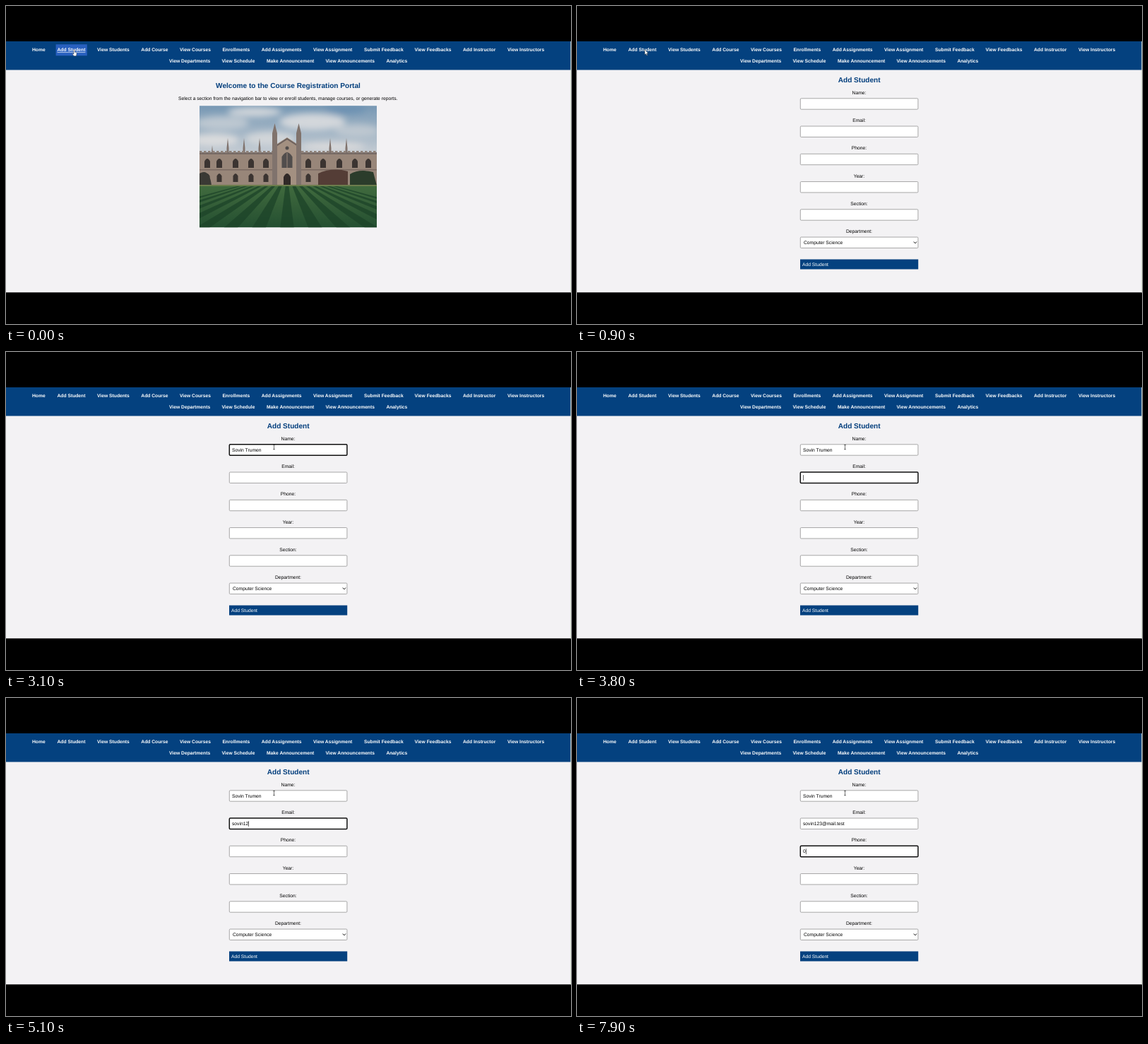
Write an HTML page that moves like this. It is 800 by 450 pixels and loops after 8 s.

```html
<!DOCTYPE html>
<html lang="en">
<head>
<meta charset="utf-8">
<title>Course Registration Portal</title>
<style>
html, body { margin: 0; width: 100%; height: 100%; overflow: hidden; background: #000; }
svg { display: block; width: 800px; height: 450px; }
text { font: 6.72px "Liberation Sans", Arial, sans-serif; text-rendering: geometricPrecision; white-space: pre; }
.mid { text-anchor: middle; }
.nav { font-weight: bold; fill: #fff; }
.title { font-size: 10.08px; font-weight: bold; fill: #043f7d; }
.hint { font: 600 6.4px "Open Sans", "Noto Sans", sans-serif; fill: #e6e6e6; }
</style>
</head>
<body>
<svg id="stage" viewBox="0 0 800 450"></svg>
<script>
const LOOP = 8000, BLUE = '#04417f';
const stage = document.getElementById('stage');
const pen = document.createElement('canvas').getContext('2d');
pen.font = '100px "Liberation Sans", Arial, sans-serif';
const textWidth = s => pen.measureText(s).width * 0.0672;

const text = (x, y, s, attrs = '') => `<text x="${x}" y="${y}" ${attrs}>${s}</text>`;
const rect = (x, y, w, h, fill, attrs = '') =>
  `<rect x="${x}" y="${y}" width="${w}" height="${h}" fill="${fill}" ${attrs}/>`;
const path = (d, fill, attrs = '') => `<path d="${d}" fill="${fill}" ${attrs}/>`;
const each = (list, fn) => list.map(fn).join('');

// Navigation and page background
const navRows = [
  [64.4, [['Home', 37], ['Add Student', 72.5], ['View Students', 129], ['Add Course', 191.3], ['View Courses', 246],
    ['Enrollments', 306.4], ['Add Assignments', 361.7], ['View Assignment', 435], ['Submit Feedback', 507],
    ['View Feedbacks', 578.6], ['Add Instructor', 647], ['View Instructors', 710]]],
  [80.4, [['View Departments', 231], ['View Schedule', 305.5], ['Make Announcement', 369],
    ['View Announcements', 452.5], ['Analytics', 538.4]]]
];
const frame = hover =>
  rect(0, 0, 800, 450, '#000') + rect(0, 50, 800, 355.3, '#f3f2f4') + rect(799, 50, 1, 355.3, '#e2ecdc') +
  rect(0, 50, 799.3, 40.5, BLUE) + (hover ? rect(70.6, 54.3, 44.2, 16, '#2860bf') : '') +
  each(navRows, ([y, items]) => each(items, ([s, x]) => text(x, y, s,
    'class="nav"' + (hover && s === 'Add Student' ? ' text-decoration="underline"' : ''))));

// Soft picture of a college court with a striped lawn
function drawPhoto() {
  const arch = (x, y, w, h, fill = '#3b3431') =>
    path(`M${x - w / 2} ${y + h}v${-h * 0.7}q${w / 2} ${-h * 0.6} ${w} 0v${h * 0.7}z`, fill);
  const spire = (x, top, w, base) =>
    path(`M${x - w / 2} ${base}V${top + 14}L${x} ${top}L${x + w / 2} ${top + 14}V${base}z`, '#80736d');
  const cloud = (x, y, rx, ry, fill) => `<ellipse cx="${x}" cy="${y}" rx="${rx}" ry="${ry}" fill="${fill}"/>`;
  const stripes = Array.from({ length: 15 }, (_, i) => {
    const x = 398 + (i - 7) * 41;
    return path(`M398 236L${x - 10} 316H${x + 10}z`, '#1d4329');
  }).join('');
  const sides = [285, 302, 325, 347, 368, 428, 449, 472, 494, 513];
  return `<defs><clipPath id="photo">${rect(274, 141.3, 251, 172, '#000')}</clipPath>
    <clipPath id="lawn">${rect(274, 254, 251, 60, '#000')}</clipPath>
    <linearGradient id="sky" x2="0" y2="1"><stop stop-color="#7798b4"/><stop offset="1" stop-color="#c8ced4"/></linearGradient>
    <linearGradient id="grass" x2="0" y2="1"><stop stop-color="#416b3e"/><stop offset="1" stop-color="#244f31"/></linearGradient>
    <filter id="soft"><feGaussianBlur stdDeviation="5"/></filter></defs><g clip-path="url(#photo)">` +
    rect(274, 141, 251, 70, 'url(#sky)') + '<g filter="url(#soft)">' +
    cloud(306, 166, 38, 10, '#bdc8d1') + cloud(352, 150, 38, 7, '#d0d5da') + cloud(434, 164, 47, 12, '#d3d7db') +
    cloud(497, 177, 31, 9, '#bdc7d0') + cloud(480, 146, 30, 6, '#6c91b2') + cloud(295, 190, 35, 9, '#dadbdd') +
    cloud(374, 188, 36, 10, '#d1d5d9') + cloud(463, 199, 46, 6, '#dadadb') + '</g>' +
    each([292, 314, 337, 359, 459, 482], x => spire(x, x === 292 ? 197 : 187, 3, 210)) +
    rect(274, 208, 251, 46, '#988679') + rect(274, 207, 251, 3, '#776b66') + rect(274, 231, 251, 1.5, '#7b6b62') +
    each(Array.from({ length: 42 }, (_, i) => 274 + i * 6), x => rect(x, 205, 3.5, 3, '#8d8078')) +
    each(sides, x => arch(x, 216, 8, 13) + arch(x, 237, 7, 12)) +
    path('M381 254V197L398 186L415 197V254z', '#a39081') + path('M381 199L398 188L415 199', 'none', 'stroke="#6d615d" stroke-width="2"') +
    spire(380.5, 166, 7, 254) + spire(414.5, 166, 7, 254) +
    arch(398, 207, 15, 22, '#514d4c') + rect(397.5, 208, 1, 21, '#9b8a7c') +
    '<circle cx="398" cy="201" r="2.5" fill="#514d4c"/>' + arch(398, 237, 10, 17, '#302927') +
    path('M442 254V237Q462 228 484 234V254z', '#543d36') +
    path('M487 254V238Q500 230 520 235L525 254z', '#2b3c2b') + path('M274 254V237Q288 229 291 254z', '#3a3934') +
    rect(274, 254, 251, 60, 'url(#grass)') + `<g clip-path="url(#lawn)" opacity=".75">${stripes}</g>` +
    rect(274, 253, 251, 2, '#6d7d4d') + '</g>';
}
const home = text(399.5, 116.4, 'Welcome to the Course Registration Portal', 'class="mid title"') +
  text(399.3, 132.8, 'Select a section from the navigation bar to view or enroll students, manage courses, or generate reports.', 'class="mid"') +
  drawPhoto();

// Form: each field has a focus time, its text and the time of every key
const labels = ['Name:', 'Email:', 'Phone:', 'Year:', 'Section:', 'Department:'];
const PITCH = 39.25;
const typing = [
  { focus: 1400, value: 'Sovin Trumen', keys: [1500, 1800, 1900, 2000, 2100, 2200, 2300, 2400, 2500, 2560, 2630, 2700] },
  { focus: 3700, value: 'sovin123@mail.test', keys: [3900, 4000, 4100, 4200, 4300, 4700, 4900, 5200, 5600,
    5700, 5800, 5900, 6000, 6100, 6200, 6300, 6400, 6500] },
  { focus: 6900, value: '0', keys: [7800] }
];
const names = ['Sovin', 'Sovi', 'Sovin Trumen', 'Sorlen Dupak'];
const emails = ['sovintrumen21@mail.test', 'sovinbolt123@mail.test', 'sovintrumen20@mail.test',
  'sovin@mail.test', 'sovintrumen@mall.test', 'sovintrumen21mail.test'];
const popups = [
  { from: 1500, to: 1800, top: 151, width: 82, rows: names },
  { from: 2100, to: 2200, top: 151, width: 82, rows: [names[0], names[2]] },
  { from: 2200, to: 2700, top: 151, width: 82, rows: [names[2]] },
  { from: 3900, to: 4700, top: 190.3, width: 112, rows: emails }
];

function field(i, t, active) {
  const y = 130.8 + i * PITCH, on = i === active, f = typing[i];
  let s = text(399.5, 124.8 + i * PITCH, labels[i], 'class="mid"') +
    rect(316.3, y, 166.6, 15.4, '#fff', `rx="1.2" stroke="${on ? '#111' : '#858585'}" stroke-width="${on ? 1.5 : 0.7}"`);
  if (i === 5) {
    s += text(321, y + 6.5 + 3.5, 'Computer Science') +
      path(`M476.8 ${y + 6.5}l2.1 2.3l2.1 -2.3`, 'none', 'stroke="#111" stroke-width="1"');
  }
  if (!f || t < f.focus) return s;
  const pressed = f.keys.filter(k => k <= t), value = f.value.slice(0, pressed.length);
  s += text(320, y + 10, value);
  const since = t - (pressed.at(-1) ?? f.focus);
  if (on && since % 1000 < 400) s += rect(320.2 + textWidth(value), y + 4, 0.6, 7.8, '#000');
  return s;
}
const popup = ({ top, width, rows }) => '<g style="filter:drop-shadow(0 1px 1.5px #0006)">' +
  path(`M374 ${top + 0.5}l4.5 -4l4.5 4z`, '#1f1f1f') +
  rect(367.3, top, width, rows.length * 18.85 + 4.4, '#1f1f1f', 'rx="3.5"') + '</g>' +
  each(rows, (s, i) => text(373.5, top + 14.3 + i * 18.85, s, 'class="hint"')).replace(/,(?=<text)/g, '');

function form(t) {
  const active = typing.findLastIndex(f => t >= f.focus);
  return text(399.7, 108.1, 'Add Student', 'class="mid title"') +
    each(labels, (_, i) => field(i, t, active)) +
    rect(316, 358.5, 167.2, 14, BLUE) + text(319, 367.7, 'Add Student', 'fill="#fff"') +
    each(popups.filter(p => t >= p.from && t < p.to), popup);
}

// Pointer: hand, arrow, then text beam
const ease = (t, from, to) => {
  const p = Math.min(1, Math.max(0, (t - from) / (to - from)));
  return p * p * (3 - 2 * p);
};
function pointer(t) {
  const go = ease(t, 1000, 1350), nudge = ease(t, 2000, 2300);
  const x = 96 + 278.6 * go + 4.9 * nudge, y = 62 + 74.6 * go - 2 * nudge;
  const shape = t >= 1300
    ? path('M-1.4 -3.2H1.4M0 -3.2V3.2M-1.4 3.2H1.4', 'none', 'stroke="#333" stroke-width=".7"')
    : t < 200
      ? path('M0 0q1 -.8 1.4 .4v3l2 .6q1 .3 .7 1.5l-.7 3.2h-3.4l-2 -3.1q.3 -1 2 .3z', '#fff', 'stroke="#222" stroke-width=".4"')
      : path('M0 0v7l1.6 -1.5l1.2 2.6l1.1 -.5l-1.2 -2.5h2.2z', '#fff', 'stroke="#222" stroke-width=".4"');
  return `<g transform="translate(${x.toFixed(2)} ${y.toFixed(2)})">${shape}</g>`;
}

let shown = '';
function draw(now) {
  const t = now % LOOP;
  const scene = frame(t < 200) + (t < 900 ? home : form(t)) +
    (t >= 400 && t < 800 ? path('M0 405.3V402H78.5q2 0 2 2v1.3z', '#202020') : '') + pointer(t);
  if (scene !== shown) stage.innerHTML = shown = scene;
  requestAnimationFrame(draw);
}
draw(performance.now());
</script>
</body>
</html>
```
